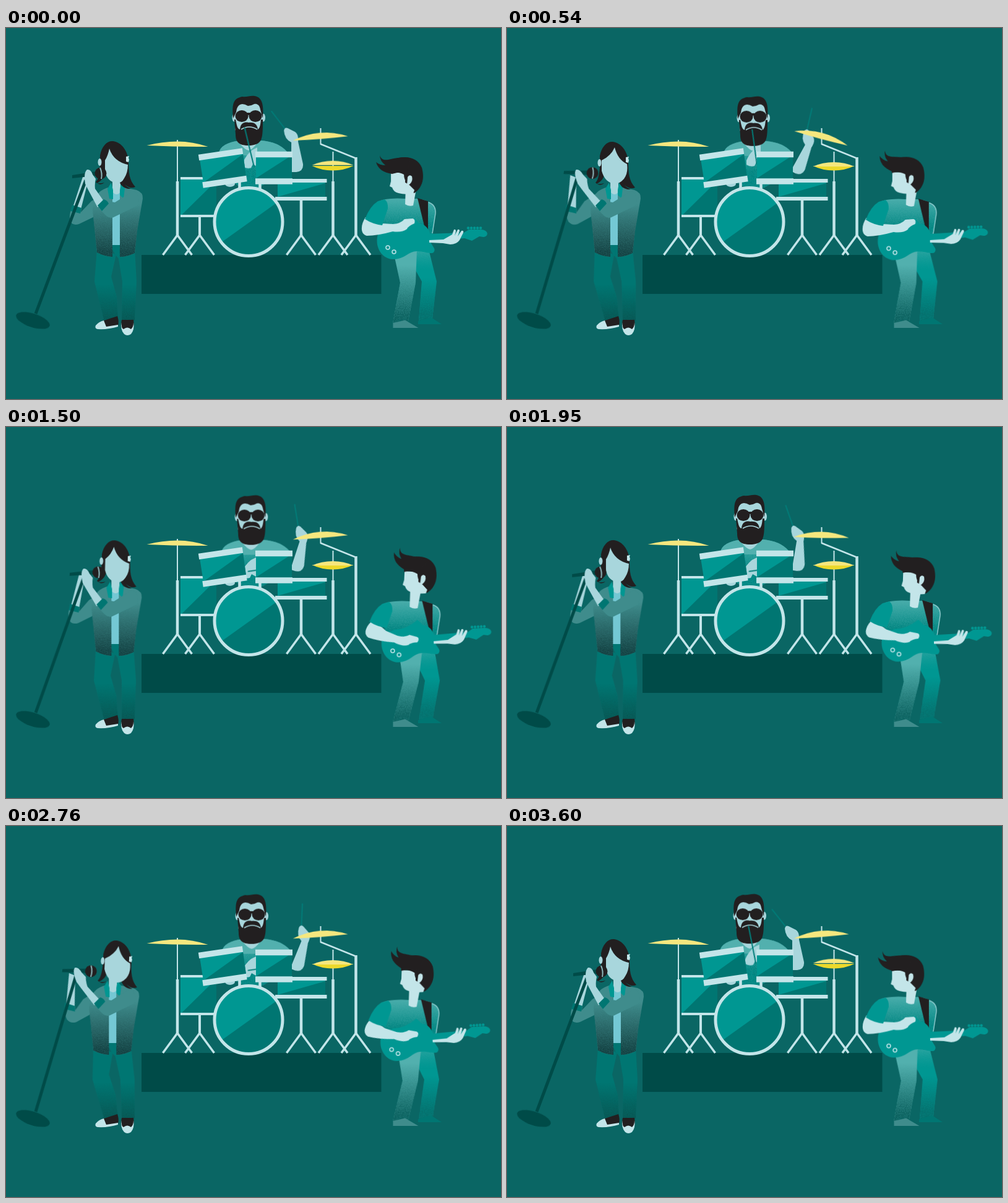
Write an HTML page without scripts that moves like this. It is 800x600 px and loops after 3.63 s.

```html
<!DOCTYPE html>
<html lang="en">
<head>
<meta charset="utf-8">
<title>Band on stage</title>
<style>
html, body { margin: 0; width: 100%; height: 100%; overflow: hidden; background: #0a6664; }
svg { display: block; width: 800px; height: 600px; }

.skin { fill: #a8d6dc; }
.pale { fill: #c3e5e9; }
.ink { fill: #221f20; }
.teal { fill: #009792; }
.deep { fill: #007672; }
.mid { fill: #52b0ae; }
.grey { fill: #3f8c8c; }
.stand { fill: #004b48; }
.sun { fill: #f5e77e; }
.gold { fill: #ecd92c; }
.grain { filter: url(#grain); }
.line { fill: none; stroke: #c3e5e9; }
.stick { stroke: #007c78; stroke-width: 2; stroke-linecap: round; }

/* Singer 1815 ms, drummer 1210 ms, strums and snare hits 605 ms */
.sing { animation: 1815ms linear infinite; }
.drum { animation: 1210ms linear infinite; }
.beat { animation: 605ms linear infinite; }

.s-body { animation-name: s-body; }
.s-legs { animation-name: s-legs; transform-origin: 180px 472px; }
.s-head { animation-name: s-head; transform-origin: 178px 250px; }
.s-face { animation-name: s-face; }
.s-lean { animation-name: s-lean; transform-origin: 150px 288px; }
.s-lean.far { transform-origin: 104px 312px; }
.s-mic { animation-name: s-mic; transform-origin: 135px 237px; }
.s-pole { animation-name: s-pole; transform-origin: 48px 462px; }
@keyframes s-body {
  0%, 95%, 100% { transform: none; }
  7.4% { transform: translateX(-.6px); }
  20.7% { transform: translateX(-8px); }
  29.8% { transform: translateX(-5px); }
  35.5%, 44% { transform: translateX(-6.5px); }
  59.5% { transform: translateX(-5px); }
  68.6% { transform: translateX(-3.5px); }
}
@keyframes s-legs {
  0%, 95%, 100% { transform: none; }
  7.4% { transform: skewX(.3deg); }
  20.7% { transform: skewX(4deg); }
  29.8% { transform: skewX(2.6deg); }
  35.5%, 44% { transform: skewX(3.3deg); }
  59.5% { transform: skewX(2.6deg); }
  68.6% { transform: skewX(1.9deg); }
}
@keyframes s-head {
  0%, 7.4%, 95%, 100% { transform: none; }
  20.7% { transform: translate(-5px, 1px) rotate(-2deg); }
  29.8% { transform: translate(-2px, 1px); }
  35.5% { transform: translate(-1px, 1px); }
  59.5% { transform: translate(5px, 3px) rotate(4deg); }
  68.6% { transform: translate(4px, 1px) rotate(3deg); }
}
@keyframes s-face {
  0%, 7.4%, 95%, 100% { d: path("M160 214Q165 206 167 195Q174 216 197 221Q197 234 191 243Q187 251 179 251Q164 249 160 232Z"); }
  20.7%, 68.6% { d: path("M155 213Q170 206 176 192Q181 212 196 219Q198 234 191 243Q184 251 176 251Q160 249 155 230Z"); }
}
@keyframes s-lean {
  0%, 95%, 100% { transform: none; }
  7.4% { transform: skewX(1deg); }
  20.7% { transform: skewX(26deg); }
  29.8%, 35.5% { transform: skewX(13.5deg); }
  44% { transform: skewX(15deg); }
  59.5% { transform: skewX(11.5deg); }
  68.6% { transform: skewX(8.5deg); }
}
@keyframes s-mic {
  0%, 95%, 100% { transform: none; }
  7.4% { transform: translateX(-1px); }
  20.7% { transform: translate(-24px, -3px) rotate(8deg); }
  29.8%, 35.5% { transform: translate(-10px, -3px) rotate(8deg); }
  44% { transform: translate(-13px, -3px) rotate(8deg); }
  59.5% { transform: translate(-7.500px, -2.500px) rotate(8deg); }
  68.6% { transform: translate(-5px, -2px) rotate(6deg); }
}
@keyframes s-pole {
  0%, 95%, 100% { transform: none; }
  7.4% { transform: rotate(-.4deg); }
  20.7% { transform: rotate(-8deg); }
  29.8% { transform: rotate(-4deg); }
  35.5%, 44% { transform: rotate(-4.6deg); }
  59.5% { transform: rotate(-3.6deg); }
  68.6% { transform: rotate(-2.1deg); }
}

.d-body { animation-name: d-body; }
.d-arm { animation-name: d-arm; transform-origin: 470px 228px; }
.d-stick { animation-name: d-stick; transform-origin: 453px 166px; }
.crash { animation-name: crash; transform-origin: 508px 176px; }
.hat { animation-name: hat; }
.d-hand { animation-name: d-hand; }
.d-snare { animation-name: d-snare; transform-origin: 399px 215px; }
@keyframes d-body {
  0%, 100% { transform: none; }
  3.3% { transform: translate(.8px, 0); }
  40% { transform: translate(7px, 1px); }
  44.6% { transform: translate(6px, .8px); }
  52.9% { transform: translate(3px, .3px); }
  61.2% { transform: translate(1px, 0); }
  89.3% { transform: translate(0, 1px); }
}
@keyframes d-arm {
  0%, 89.3%, 100% { transform: none; }
  3.3% { transform: rotate(8deg); }
  20% { transform: rotate(14deg); }
  40% { transform: translate(-1px, 3px) rotate(34deg); }
  44.6% { transform: translate(-1px, 3px) rotate(29deg); }
  52.9% { transform: rotate(16deg); }
  61.2% { transform: rotate(9.5deg); }
}
@keyframes d-stick {
  0%, 100% { transform: none; }
  3.3% { transform: rotate(-3deg); }
  20% { transform: rotate(3deg); }
  40% { transform: rotate(40deg); }
  44.6% { transform: rotate(22deg); }
  52.9% { transform: rotate(13deg); }
  61.2% { transform: rotate(9deg); }
  89.3% { transform: rotate(-3deg); }
}
@keyframes crash {
  0%, 38%, 89%, 100% { transform: rotate(-4.5deg); }
  44.6% { transform: rotate(15.5deg); }
  52.9% { transform: rotate(-14.5deg); }
  61.2% { transform: rotate(1deg); }
  70% { transform: rotate(-8deg); }
  79% { transform: rotate(-3deg); }
}
@keyframes hat {
  0%, 97.5%, 100% { transform: translateY(-2.2px); }
  3.3%, 5% { transform: translateY(-4px); }
  10%, 91% { transform: none; }
}
@keyframes d-hand {
  0%, 100% { transform: none; }
  6.3% { transform: translate(-1px, 8px); }
  22.3%, 60% { transform: translate(-2px, 18px); }
  78.5% { transform: translate(-1px, 13px); }
  89.3% { transform: translate(4px, -3px); }
}
@keyframes d-snare {
  0%, 100% { transform: none; }
  6.3% { transform: rotate(29deg) scale(1, .7); }
  22.3%, 62% { transform: rotate(105deg) scale(1, .6); }
  78.5% { transform: rotate(68deg) scale(1, .9); }
  89.3% { transform: rotate(9deg) scale(1, .85); }
}

.g-body { animation-name: g-body; }
.g-legs { animation-name: g-legs; transform-origin: 650px 480px; }
.g-head { animation-name: g-head; transform-origin: 652px 270px; }
.g-fringe { animation-name: g-fringe; transform-origin: 636px 226px; }
.g-guitar { animation-name: g-guitar; transform-origin: 640px 345px; }
.g-arm { animation-name: g-arm; transform-origin: 584px 322px; }
@keyframes g-body {
  0%, 100% { transform: none; }
  6.3% { transform: translate(2px, 2px); }
  22.3% { transform: translate(6px, 5px); }
  45% { transform: translate(8px, 6px); }
  78.5% { transform: translate(1px, 4px); }
  89.3% { transform: translate(-.3px, 1px); }
}
@keyframes g-legs {
  0%, 100% { transform: none; }
  6.3% { transform: skewX(-1deg); }
  22.3% { transform: skewX(-3.6deg); }
  45% { transform: skewX(-4.5deg); }
  78.5% { transform: skewX(-.8deg); }
  89.3% { transform: skewX(.4deg); }
}
@keyframes g-head {
  0%, 100% { transform: none; }
  6.3% { transform: translate(2px, -2px); }
  22.3% { transform: translate(11px, -3px) rotate(2deg); }
  45% { transform: translate(14px, -5px) rotate(3deg); }
  78.5% { transform: translate(4px, -5px); }
  89.3% { transform: translate(1px, -1.500px); }
}
@keyframes g-fringe {
  0%, 100% { transform: none; }
  6.3% { transform: rotate(4deg); }
  22.3% { transform: rotate(14deg); }
  45% { transform: rotate(20deg); }
  78.5% { transform: rotate(25deg); }
  89.3% { transform: rotate(15deg); }
}
@keyframes g-guitar {
  0%, 100% { transform: none; }
  6.3% { transform: rotate(-.9deg); }
  22.3% { transform: rotate(-1.7deg); }
  45% { transform: rotate(-3deg); }
  78.5% { transform: rotate(-3.8deg); }
  89.3% { transform: rotate(-1.3deg); }
}
@keyframes g-arm {
  0%, 89.3%, 100% { transform: none; }
  6.3% { transform: rotate(2deg); }
  22.3% { transform: rotate(16deg); }
  45% { transform: rotate(22deg); }
  78.5% { transform: rotate(1deg); }
}
</style>
</head>
<body>
<svg viewBox="0 0 800 600" xmlns="http://www.w3.org/2000/svg">
<defs>
  <filter id="grain" x="0" y="0" width="100%" height="100%" color-interpolation-filters="sRGB">
    <feTurbulence type="fractalNoise" baseFrequency=".9" numOctaves="2" seed="4"/>
    <feColorMatrix values="0 0 0 0 1  0 0 0 0 1  0 0 0 0 1  4 0 0 0 -1.5"/>
    <feComposite in="SourceGraphic" operator="arithmetic" k1=".3" k2=".8"/>
  </filter>
  <linearGradient id="dusk" x2="0" y2="1">
    <stop offset=".25" stop-color="#123f40" stop-opacity="0"/>
    <stop offset="1" stop-color="#123f40"/>
  </linearGradient>
  <linearGradient id="hem" x2="0" y2="1">
    <stop offset=".5" stop-color="#085451" stop-opacity="0"/>
    <stop offset="1" stop-color="#085451" stop-opacity=".9"/>
  </linearGradient>
  <linearGradient id="shade" x2="0" y2="1">
    <stop offset=".2" stop-color="#0a5f5d" stop-opacity="0"/>
    <stop offset=".95" stop-color="#0a5f5d"/>
  </linearGradient>
  <linearGradient id="wash" x2="0" y2="1">
    <stop offset="0" stop-color="#52b0ae" stop-opacity=".6"/>
    <stop offset=".3" stop-color="#1a9e9a" stop-opacity="0"/>
    <stop offset=".4" stop-color="#056f6c" stop-opacity="0"/>
    <stop offset=".95" stop-color="#056f6c"/>
  </linearGradient>
  <linearGradient id="chest" x2="0" y2="1">
    <stop offset="0" stop-color="#008f8b" stop-opacity=".1"/>
    <stop offset=".7" stop-color="#00837f"/>
  </linearGradient>
  <path id="tripod" d="M-23.500 32L0 0L23.500 32" class="line" stroke-width="3.500"/>
  <path id="leg-l" d="M147 358L143 410L158 472L181 468L179 435L170 402L178 366Z"/>
  <path id="leg-r" d="M180 362L188 410L187 473L208 473L211 410L208 358Z"/>
  <path id="jacket-l" d="M165 258C152 262 141 270 140 295L147 363Q158 369 172 370V268Z"/>
  <path id="jacket-r" d="M187 257L211 262Q222 266 221 276L212 328L208 364Q196 370 184 370V268Z"/>
  <path id="pant-l" d="M627 366L637 412L625 478L650 474L662 412L664 360Z"/>
  <path id="pant-r" d="M662 358H683L696 410L689 470L667 474L672 410L662 392Z"/>
  <path id="shirt" d="M600 282Q612 274 645 276H664Q688 278 694 293L688 345H608Z"/>
  <path id="torso" d="M344 202Q347 186 378 182H412Q440 184 454 200L440 240L408 258H380L352 240Z"/>
</defs>

<rect class="stand" x="219" y="367" width="387.500" height="63"/>

<!-- Drummer -->
<g class="drum d-arm">
  <g class="drum d-stick"><path class="stick" d="M453 166L429 135"/></g>
  <path class="skin" d="M449 166Q450 160 455 162L467 168Q473 172 472 184L480 220Q481 232 469 233H461V185Q450 180 449 166Z"/>
</g>
<g class="drum d-body">
  <use href="#torso" class="mid"/>
  <use href="#torso" class="grain" fill="url(#chest)"/>
  <path class="mid" d="M344 202Q347 186 378 182L392 196L412 182Q440 184 454 200L430 206H350Z"/>
  <path class="skin" d="M378 180H406V186Q398 197 392 198Q386 197 378 187Z"/>
  <ellipse class="skin" cx="368.500" cy="145" rx="3" ry="6.500"/>
  <ellipse class="skin" cx="416" cy="145" rx="3" ry="6.500"/>
  <path class="skin" d="M370 124Q392 112 414 124V165Q392 182 370 165Z"/>
  <path class="ink" d="M367 146C365 122 367 114 382 111C390 112 394 109 402 110C413 112 417 122 415 146L411 132C410 124 405 122 401 123Q396 126 391 126Q386 123 382 123C374 124 373 130 372 136Z"/>
  <path class="ink" d="M369 148H371C373 158 374 163 378 164C379 152 387 152 392 153C399 152 406 154 407 164C410 162 411 158 412 148H415C415 160 415 172 413 178C411 188 400 190 392 190C376 190 371 184 371 172Z"/>
  <path d="M380 164Q393 156 406 164" fill="none" stroke="#a8d6dc" stroke-width="1.500"/>
  <ellipse class="ink" cx="381" cy="142.500" rx="10.500" ry="9.500"/>
  <ellipse class="ink" cx="403" cy="142.500" rx="10.500" ry="9.500"/>
  <path class="ink" d="M388 137H396V141H388Z"/>
</g>
<g class="beat d-hand">
  <path class="skin" d="M383 217Q388 205 398 197L406 193V224L399 220L396 226Q389 228 383 224Z"/>
  <g class="beat d-snare"><path class="stick" d="M401 224L385 161"/></g>
</g>
<ellipse class="skin" cx="362" cy="252" rx="8" ry="5"/>

<!-- Drum kit -->
<path class="teal" d="M282 243H340V304H282Z"/>
<path class="deep" d="M340 247V304H282Z"/>
<path class="line" stroke-width="4" d="M282 243H340M282 304H340M313 304V336"/>
<path class="line" stroke-width="2" d="M277 181V250M528.500 200V250M508.500 162V188"/>
<path class="line" stroke-width="2.500" d="M508 187.500L566 211"/>
<path class="line" stroke-width="4.500" d="M277 248V336M528.500 248V336M565.500 209V336M477 279V336M377.500 246V262M410.500 250V262"/>
<use href="#tripod" x="277" y="335"/><use href="#tripod" x="313" y="335"/>
<use href="#tripod" x="477" y="335"/><use href="#tripod" x="528.500" y="335"/><use href="#tripod" x="565.500" y="335"/>
<path class="teal" d="M313 212L383 203L388 240L319 250Z"/>
<path class="deep" d="M383 204L388 240L319 250Z"/>
<path class="line" stroke-width="9.500" d="M311.500 209.500L382.500 199M318 254L389 243.500"/>
<path class="teal" d="M439 249H516V273H439Z"/>
<path class="deep" d="M516 251V273H439Z"/>
<path class="line" stroke-width="6" d="M437 247H518.500M435 276H518.500"/>
<path class="teal" d="M404 206H462V245H404Z"/>
<path class="deep" d="M457 209H462V243H404Z"/>
<path class="line" stroke-width="9.500" d="M403 204.500H463M403 248H463"/>
<circle class="teal" cx="392" cy="313.500" r="54"/>
<path class="deep" d="M437 283A54 54 0 0 1 349 346Z"/>
<circle class="line" cx="392" cy="313.500" r="55" stroke-width="5"/>
<path class="sun" d="M227.500 190Q252 183.500 277 183.500T326.500 192Q277 192.500 227.500 190Z"/>
<path class="gold" d="M494.500 223H561.500Q546 230.500 528 230.500T494.500 223Z"/>
<path class="sun drum hat" d="M494.500 224Q510 217 528 217T561.500 224Z"/>
<path class="sun drum crash" d="M463.500 178.500Q486 169.500 508 169.500T552.500 178.500Q508 180.500 463.500 178.500Z"/>

<!-- Singer -->
<ellipse class="stand" cx="43.500" cy="473" rx="28.500" ry="11" transform="rotate(18 43.500 473)"/>
<g class="sing s-legs">
  <use href="#leg-l" class="deep"/><use href="#leg-r" class="deep"/>
  <path class="deep" d="M168 349H188V366L183 374L176 366Z"/>
  <g class="grain" fill="url(#hem)"><use href="#leg-l"/><use href="#leg-r"/></g>
</g>
<path class="ink" d="M155 474L180 466Q183 474 181 482L160 484Z"/>
<path class="pale" d="M158 473L162 483L181 480V483Q165 488 148 487Q143 486 145 481Q150 475 158 473Z"/>
<path class="ink" d="M187 472H206Q208 482 204 488H188Q185 480 187 472Z"/>
<path class="pale" d="M187 476Q186 486 190 487Q196 482 202 487Q206 484 206 476Q208 488 202 495Q196 499 191 495Q184 487 187 476Z"/>
<g class="sing s-body">
  <g class="sing s-lean far">
    <path class="grey" d="M107 290Q101 302 104 313Q108 320 118 317L170 292L160 268L138 280L121 298L122 291Z"/>
    <path class="skin" d="M108 290L121 293L134 242L125 238Z"/>
    <path class="deep" d="M107 286L122 291L120 300L104 296Z"/>
  </g>
  <path fill="#74c8d4" d="M171 262H186V351H171Z"/>
  <path class="skin" d="M172 240H185V265Q179 273 172 265Z"/>
  <use href="#jacket-l" class="grey"/><use href="#jacket-r" class="grey"/>
  <g class="grain" fill="url(#dusk)"><use href="#jacket-l"/><use href="#jacket-r"/></g>
  <path class="teal" d="M170 250L164 260L167 276L173 277V262ZM186 250L192 259L190 276L184 270V262Z"/>
</g>
<g class="sing s-head">
  <path class="ink" d="M152 206C155 190 164 182 173 183C187 185 196 198 198 214C198 234 199 246 209 257Q201 261 192 253Q196 258 202 260Q188 261 183 248L180 236L160 228Q161 244 147 251Q153 252 159 250Q152 256 145 249Q153 242 152 206Z"/>
  <ellipse class="skin" cx="151.500" cy="217" rx="3" ry="6"/>
  <path class="skin sing s-face" d="M160 214Q165 206 167 195Q174 216 197 221Q197 234 191 243Q187 251 179 251Q164 249 160 232Z"/>
  <path class="pale" d="M194 208L199 207L198 210L199 213L198 217L194 216Z"/>
</g>
<g class="sing s-pole"><path d="M48 462L129 246" stroke="#004b48" stroke-width="5"/></g>
<g class="sing s-body">
  <g class="sing s-mic">
    <path class="stand" d="M107 238L145 232V239L107 243Z"/>
    <circle class="ink" cx="153" cy="235" r="9.500"/>
    <path d="M152 226Q156 235 154 244" fill="none" stroke="#8db9bd" stroke-width="2"/>
  </g>
  <path class="grey" d="M150 291L158 279L176 282L205 264Q218 268 213 287L176 305Q168 310 160 302Z"/>
  <g class="sing s-lean">
    <path class="skin" d="M128 252Q125 234 131 229Q137 228 140 237L145 244Q143 252 144 260L158 280L148 290L133 262Z"/>
  </g>
  <path class="deep" d="M148 287L158 277Q164 279 166 284L155 296Z"/>
</g>

<!-- Guitarist -->
<g class="beat g-legs">
  <use href="#pant-r" class="teal"/><use href="#pant-r" class="grain" fill="url(#wash)"/>
  <use href="#pant-l" class="mid"/><use href="#pant-l" class="grain" fill="url(#shade)"/>
</g>
<path class="grey" d="M625.500 485V477L645 472.500L666.500 485Z"/>
<path class="deep" d="M666 479V474L687 468L704 479Z"/>
<g class="beat g-body">
  <use href="#shirt" class="mid"/><use href="#shirt" class="grain" fill="url(#chest)"/>
  <path d="M683 282Q695 286 694 300L689 332" fill="none" stroke="#8fcdcf" stroke-width="1.500"/>
  <path class="pale" d="M646 255H664L658 287Q651 289 645 285Z"/>
  <path class="ink" d="M665 275L682 280V332L677 324Z"/>
  <g class="beat g-head">
    <path class="ink" d="M622 214C640 206 664 206 672 226C677 245 672 258 660 267L644 262L634 236Z"/>
    <path class="pale" d="M622 234H645V250L650 252L660 262L658 268Q644 270 634 267Q626 265 624 258L620 256L622 248Z"/>
    <path class="ink" d="M621 229H648V252Q643 244 643 237Q633 231 621 235Z"/>
    <path class="pale" d="M649 241Q652 236 656 240Q658 248 652 253L648 253Z"/>
    <path class="ink beat g-fringe" d="M604 206C607 215 614 214 622 212Q640 208 652 210L648 234Q636 232 624 236C610 234 601 228 598 217Q604 222 613 222Q604 215 604 206Z"/>
  </g>
  <g class="beat g-guitar">
    <path class="teal" d="M603 329C594 347 603 372 625 374C645 374 650 361 664 361C677 361 690 368 692 361C695 355 685 351 686 341C687 328 678 317 668 316L660 307Q640 322 622 321Z"/>
    <path class="teal" d="M682 333L740 331L748 326H768C781 327 780 338 771 338L765 337L753 344L741 340L682 345Z"/>
    <path d="M747 323.500H769" stroke="#009792" stroke-width="4.500" stroke-linecap="round" stroke-dasharray="0 5"/>
    <g class="line" stroke-width="1.500"><circle cx="617" cy="355" r="3"/><circle cx="627" cy="362" r="3"/></g>
    <path class="pale" d="M684 343L707 342L721 334L724 326Q727 325 727 329L725 336L730 326Q733 325 733 328L730 337L736 328Q740 327 739 331L733 343Q728 350 718 350L706 348L684 347Z"/>
  </g>
  <g class="beat g-arm">
    <path class="pale" d="M581 306C573 318 572 333 583 336Q600 336 625 329Q640 331 648 325Q650 320 660 316Q662 309 657 308L644 309Q638 316 626 317L606 316Z"/>
  </g>
  <path class="teal" d="M601 280Q588 288 580 309Q592 317 608 319L617 292Q618 282 612 277Z"/>
</g>
</svg>
</body>
</html>
```
